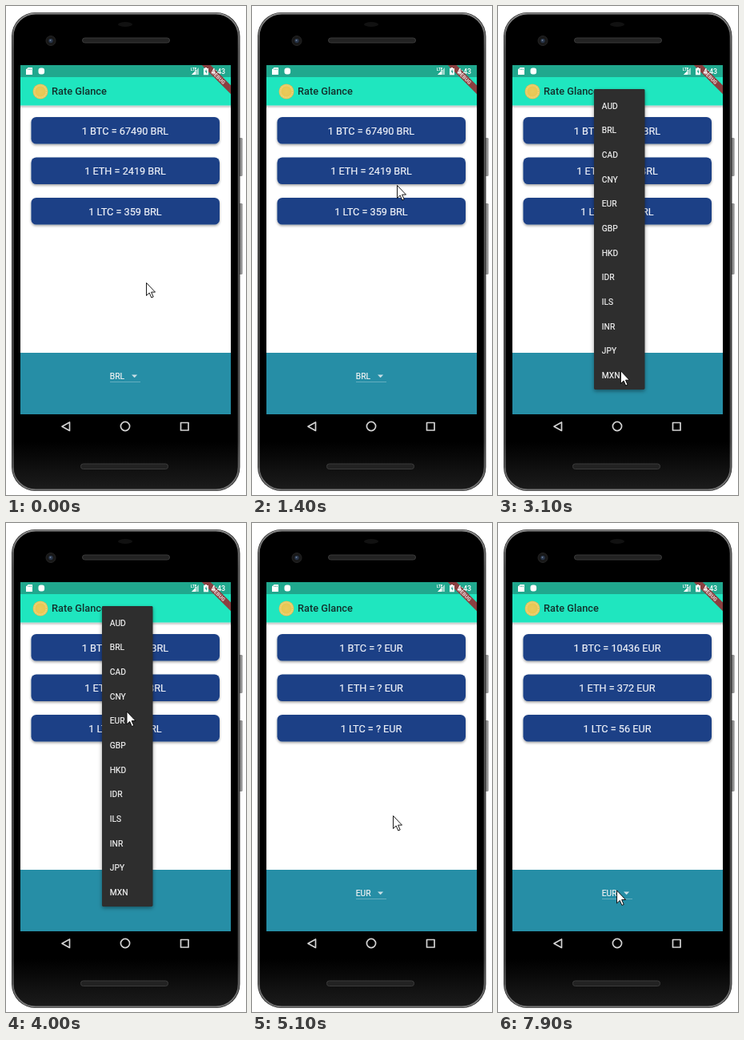
An HTML page that plays this animation: 300 px wide and 612 px high, repeating every 8 s.

```html
<!DOCTYPE html>
<html lang="en">
<head>
<meta charset="utf-8">
<title>Rate Glance</title>
<style>
html, body { margin: 0; width: 100%; height: 100%; overflow: hidden; background: #fff; }
svg { display: block; width: 300px; height: 612px; font-family: Roboto, Arial, sans-serif; }
.card { font-size: 12.7px; fill: #eef1f8; text-anchor: middle; stroke: #eef1f8; stroke-width: .2px; }
.item { font-size: 10.24px; fill: #f4f4f4; stroke: #f4f4f4; stroke-width: .2px; }
</style>
</head>
<body>
<svg viewBox="0 0 300 612">
  <defs>
    <linearGradient id="rim" x2="0" y2="1">
      <stop stop-color="#8a8a8a"/><stop offset=".08" stop-color="#5c5c5c"/>
      <stop offset=".9" stop-color="#4c4c4c"/><stop offset="1" stop-color="#7a7a7a"/>
    </linearGradient>
    <linearGradient id="face" x2="0" y2="1">
      <stop offset=".9" stop-color="#000"/><stop offset="1" stop-color="#1c1c1c"/>
    </linearGradient>
    <linearGradient id="button">
      <stop stop-color="#4a4a4a"/><stop offset=".6" stop-color="#a0a0a0"/><stop offset="1" stop-color="#777"/>
    </linearGradient>
    <linearGradient id="barShade" x2="0" y2="1">
      <stop stop-opacity=".25"/><stop offset="1" stop-opacity="0"/>
    </linearGradient>
    <radialGradient id="gold">
      <stop stop-color="#eacb5c"/><stop offset=".65" stop-color="#e8c653"/>
      <stop offset=".8" stop-color="#f5e189"/><stop offset="1" stop-color="#dcb243"/>
    </radialGradient>
    <filter id="cardShadow" x="-10%" y="-30%" width="120%" height="170%">
      <feDropShadow dx="0" dy="1.6" stdDeviation="1.7" flood-opacity=".38"/>
    </filter>
    <filter id="menuShadow" x="-20%" y="-10%" width="140%" height="120%">
      <feDropShadow dx="0" dy="2" stdDeviation="2.8" flood-opacity=".4"/>
    </filter>
    <clipPath id="screen"><rect x="18" y="74" width="263" height="437"/></clipPath>
  </defs>

  <!-- phone -->
  <g fill="url(#button)">
    <rect x="291" y="165" width="4.5" height="48" rx="1.2"/>
    <rect x="291" y="247" width="4.5" height="89" rx="1.2"/>
  </g>
  <rect x="7" y="8" width="285.5" height="599" rx="30" fill="#2a2a2a"/>
  <rect x="8.7" y="9.5" width="282" height="596" rx="28.5" fill="url(#face)" stroke="url(#rim)" stroke-width="1.8"/>
  <ellipse cx="149" cy="23" rx="9" ry="3" fill="#111"/>
  <circle cx="56" cy="43.5" r="6" fill="#181818" stroke="#242424"/>
  <circle cx="56" cy="43.5" r="2.7" fill="#28354a"/>
  <circle cx="55.5" cy="43" r="1" fill="#6d7e96"/>
  <g fill="#222" stroke="#3b3b3b">
    <rect x="95.5" y="40" width="109" height="6" rx="3"/>
    <rect x="93.5" y="573" width="109" height="6.5" rx="3"/>
  </g>
  <g fill="none" stroke="#d2d2d2" stroke-width="1.7" stroke-linejoin="round">
    <path d="M79.5 521V531.5L70 526.2Z"/>
    <circle cx="149" cy="526" r="5.6"/>
    <rect x="218.5" y="521.5" width="9.5" height="9.5"/>
  </g>

  <!-- app -->
  <g clip-path="url(#screen)">
    <rect x="18" y="74" width="263" height="437" fill="#fff"/>
    <rect x="18" y="124.5" width="263" height="4" fill="url(#barShade)"/>
    <rect x="18" y="89" width="263" height="35.5" fill="#1fe6bf"/>
    <rect x="18" y="74" width="263" height="15" fill="#20a88e"/>
    <circle cx="43" cy="107" r="9.5" fill="url(#gold)"/>
    <circle cx="43" cy="107" r="7.6" fill="none" stroke="#c39a3a" stroke-width=".6" stroke-dasharray="1 1"/>
    <text x="57" y="111.4" font-size="12.8" font-weight="500" fill="#12302c">Rate Glance</text>
    <rect x="18" y="434" width="263" height="77" fill="#268ea6"/>
    <g transform="translate(281 74) rotate(45)">
      <rect x="-27" y="17.9" width="54" height="7.7" fill="#8b3f40"/>
      <text y="24.1" font-size="6.5" font-weight="900" fill="#e3cfcf" text-anchor="middle">DEBUG</text>
    </g>
    <g fill="#fff">
      <path d="M27.6 77H33V86H25V79.6Z"/>
      <path d="M27.8 78.5V80M29.6 78.5V80M31.4 78.5V80" stroke="#20a88e" stroke-width=".8"/>
      <rect x="40.5" y="77.5" width="7.6" height="8" rx="3"/>
      <path d="M241 77V86H232Z" fill-opacity=".55"/>
      <path d="M237 81V86H232Z"/>
      <text x="231" y="81" font-size="4.5" font-weight="700">LTE</text>
      <path d="M248.7 77H251V78H253V86.3H247V78H248.7Z"/>
      <path d="M250.5 79L248.6 82.6H250V85L251.8 81.6H250.5Z" fill="#20a88e"/>
      <text x="256.5" y="85" font-size="9" font-weight="500">4:43</text>
    </g>
    <g id="cards"></g>
    <text id="choice" class="item" x="129.8" y="466.8"></text>
    <path d="M130 470.5H168" stroke="#7fbccb" stroke-width=".7"/>
    <path d="M157 461.6H164.2L160.6 465.2Z" fill="#c9dfe6"/>
    <g id="menu">
      <rect id="sheet" x="120" width="63.5" rx="1.4" fill="#2f2f2f" filter="url(#menuShadow)"/>
      <g id="items"></g>
    </g>
  </g>
  <path id="cursor" d="M0 0V16L3.7 12.5L6.3 18.5L8.7 17.5L6.1 11.6H11Z" fill="#fff" stroke="#000" stroke-width=".9"/>
</svg>
<script>
const LOOP = 8000, STEP = 100;
const OPEN = 2800, PICK = 4500, LOADED = 5900;
const coins = ['BTC', 'ETH', 'LTC'];
const rates = { BRL: [67490, 2419, 359], EUR: [10436, 372, 56] };
const currencies = 'AUD BRL CAD CNY EUR GBP HKD IDR ILS INR JPY MXN'.split(' ');

// time, x, y of the pointer tip
const path = [
  [0, 175.5, 346.5], [400, 175, 340], [1000, 180, 205], [1400, 181.5, 224.5], [1700, 179, 250],
  [2500, 153.5, 466.5], [3000, 153.5, 466.5], [3800, 151, 236], [4600, 151, 236],
  [5100, 176.5, 366.5], [5600, 184.5, 400], [6600, 184.5, 406.5], [7200, 150, 458], [8000, 148.5, 460]
];

const $ = id => document.getElementById(id);
const clamp = v => Math.max(0, Math.min(1, v));
const mix = (a, b, p) => a + (b - a) * p;
const ease = p => p * p * (3 - 2 * p);

function add(parent, tag, attrs, text = '') {
  const el = document.createElementNS('http://www.w3.org/2000/svg', tag);
  for (const key in attrs) el.setAttribute(key, attrs[key]);
  el.textContent = text;
  parent.append(el);
  return el;
}

const labels = coins.map((coin, i) => {
  const y = 139 + i * 50.5;
  add($('cards'), 'rect', { x: 31.5, y, width: 235.5, height: 33.6, rx: 6.4, fill: '#1c4086', filter: 'url(#cardShadow)' });
  return add($('cards'), 'text', { class: 'card', x: 149, y: y + 21.7 });
});
const items = currencies.map((name, i) =>
  add($('items'), 'text', { class: 'item', x: 129.8, y: 128.5 + i * 30.68 }, name));

function pointerAt(t) {
  const i = path.findIndex(k => k[0] > t);
  const [t0, x0, y0] = path[i - 1], [t1, x1, y1] = path[i];
  const p = ease((t - t0) / (t1 - t0));
  return [mix(x0, x1, p), mix(y0, y1, p)];
}

function drawMenu(t) {
  const open = clamp((t - OPEN) / 300);
  const closing = clamp((t - PICK) / 100);
  const shown = clamp(open * 4) * (1 - closing);
  const grow = ease(clamp((open - .25) * 4));
  const top = mix(140, 104, grow), bottom = mix(171, 480, grow);
  $('menu').setAttribute('opacity', shown);
  $('sheet').setAttribute('y', top);
  $('sheet').setAttribute('height', bottom - top);
  items.forEach((el, i) => el.setAttribute('opacity', i === 1 ? 1 : clamp((open - .5 - i * .03) * 8)));
}

function draw(t) {
  const currency = t < PICK ? 'BRL' : 'EUR';
  const waiting = t >= PICK && t < LOADED;
  labels.forEach((el, i) => {
    el.textContent = `1 ${coins[i]} = ${waiting ? '?' : rates[currency][i]} ${currency}`;
  });
  $('choice').textContent = currency;
  drawMenu(t);
  $('cursor').setAttribute('transform', `translate(${pointerAt(t)})`);
}

const start = performance.now();
function tick() {
  const t = (performance.now() - start) % LOOP;
  draw(Math.floor(t / STEP) * STEP);
  requestAnimationFrame(tick);
}
tick();
</script>
</body>
</html>
```
